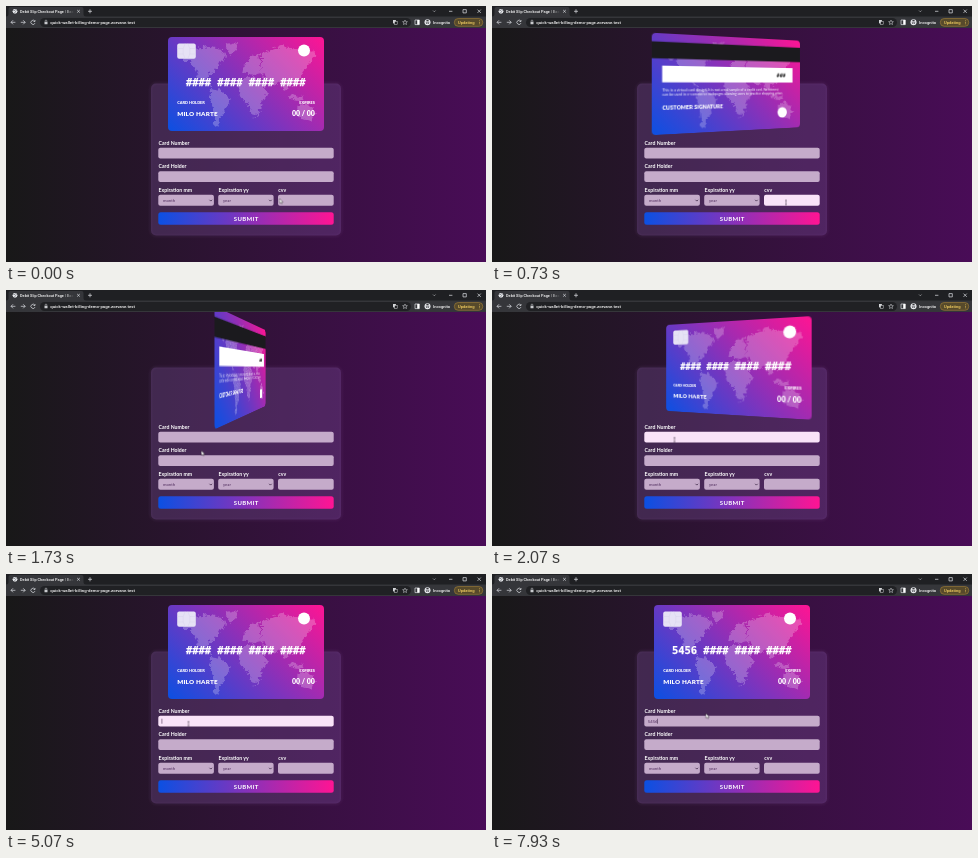
An HTML page for the animation above (8 s loop, 480x256 px).

```html
<!DOCTYPE html>
<html lang="en">
<head>
<meta charset="utf-8">
<title>Checkout form</title>
<style>
  html, body { margin: 0; width: 100%; height: 100%; overflow: hidden; background: #181818; }
  #stage { position: absolute; left: 0; top: 0; width: 480px; height: 256px; overflow: hidden; }
  svg { position: absolute; left: 0; top: 0; overflow: visible; }
  text { font-family: Lato, "Open Sans", sans-serif; fill: #fff; white-space: pre; }
  .ui { font-family: Roboto, "Noto Sans", sans-serif; font-size: 4.1px; font-weight: 500; }
  .label { font-size: 5.2px; font-weight: 700; }
  .value { font-size: 4.2px; fill: #4e2b5c; }
  .bold { font-weight: 900; }
  .num { font: 700 10.46px "DejaVu Sans Mono", "Noto Sans Mono", monospace; stroke: #fff; stroke-width: .25; }
  .field { fill: #c5abca; }
  .field.hot { fill: #f9e3f8; }
  .line { fill: none; stroke: #dfe1e5; stroke-width: .7; }

  #view { position: absolute; left: 0; top: 22px; width: 480px; height: 234px; overflow: hidden; }
  #scene { position: absolute; left: 162px; top: 9.3px; width: 156.25px; height: 93.75px; perspective: 312.5px; }
  #card { width: 100%; height: 100%; transform-style: preserve-3d; animation: flip 8s infinite; }
  .face {
    position: absolute; inset: 0; overflow: hidden; border-radius: 4px;
    background: linear-gradient(45deg, #0b50e2, #ff1493);
    backface-visibility: hidden;
  }
  .back { transform: rotateY(180deg); }
  #pointer { animation: glide 8s linear infinite; }

  @keyframes flip {
    0%, 1.52% { transform: rotateY(0deg); }
    14.02%, 18.56% { transform: rotateY(-180deg); }
    31.06%, 100% { transform: rotateY(0deg); }
  }
  @keyframes glide {
    0% { transform: translate(273.5px, 192.5px); }
    4.5%, 17% { transform: translate(294px, 196.5px); }
    18.5% { transform: translate(262px, 186px); }
    21.6% { transform: translate(195.5px, 160.7px); }
    25%, 68.8% { transform: translate(182.5px, 149.8px); }
    70%, 100% { transform: translate(213.8px, 139.4px); }
  }
</style>
</head>
<body>
<div id="stage">
  <svg width="480" height="256" viewBox="0 0 480 256">
    <defs>
      <linearGradient id="page"><stop stop-color="#181818"/><stop offset="1" stop-color="#490c57"/></linearGradient>
      <linearGradient id="hue"><stop stop-color="#0b50e2"/><stop offset="1" stop-color="#ff1493"/></linearGradient>
      <linearGradient id="fade"><stop offset=".8" stop-color="#35363a" stop-opacity="0"/><stop offset="1" stop-color="#35363a"/></linearGradient>
      <filter id="soft" x="-10%" y="-10%" width="120%" height="120%"><feGaussianBlur stdDeviation="1"/></filter>
      <filter id="coast">
        <feTurbulence baseFrequency=".16" numOctaves="2" seed="4"/>
        <feDisplacementMap in="SourceGraphic" scale="7" xChannelSelector="R" yChannelSelector="G"/>
      </filter>
      <pattern id="dots" width="1.5" height="1.5" patternUnits="userSpaceOnUse">
        <rect width="1.5" height="1.5" fill="#fff" opacity=".13"/>
        <circle cx=".75" cy=".75" r=".55" fill="#fff" opacity=".3"/>
      </pattern>
      <g id="map" fill="url(#dots)" filter="url(#coast)">
        <path d="M14 16L24 10 40 8 52 10 56 18 50 24 46 32 40 36 36 42 42 47 36 46 29 38 24 28 20 22 13 22Z"/>
        <path d="M56 5L68 3 66 11 60 16Z"/>
        <path d="M42 50L52 52 60 60 56 70 50 80 47 90 44 82 43 68 39 58Z"/>
        <path d="M72 40L84 38 92 44 98 54 92 64 88 76 82 79 78 66 70 56 68 48Z"/>
        <path d="M72 34L74 26 82 18 90 14 92 34 84 36Z"/>
        <path d="M92 14L110 8 130 10 146 14 140 24 132 34 128 44 122 46 114 52 110 44 102 46 96 40 92 34Z"/>
        <path d="M120 56L132 58 134 62 122 60Z"/>
        <path d="M126 68L136 64 146 74 140 82 128 78Z"/>
      </g>
    </defs>

    <rect width="480" height="256" fill="url(#page)"/>

    <!-- browser bar -->
    <rect width="480" height="11" fill="#1f2023"/>
    <path d="M0 10.5Q2.5 10.5 2.5 8V3Q2.5 1 4.5 1H75.5Q77.5 1 77.5 3V8Q77.5 10.5 80 10.5H480V22H0Z" fill="#35363a"/>
    <circle cx="9" cy="5.3" r="2.4" fill="#e8eaed"/>
    <path d="M7.3 4.5h1.6l.7 1.2-1.2 1.3M9.5 3.4l1.2 1.2" class="line" style="stroke:#55585e;stroke-width:.6"/>
    <text x="14" y="6.9" class="ui" style="font-size:3.9px">Debit Slip Checkout Page | Basic</text>
    <rect x="14" y="2" width="54" height="7" fill="url(#fade)"/>
    <rect x="67.9" y="2" width="3" height="7" fill="#35363a"/>
    <path class="line" d="M71.2 4l2.6 2.6m0-2.6l-2.6 2.6M82 5.3h4m-2-2v4"/>
    <path class="line" d="M427 4.5l1.3 1.3 1.3-1.3" style="stroke-width:.5"/>
    <path class="line" d="M443 5.3h3.4M457 3.6h3.3v3.3h-3.3zM471.5 3.6l3.3 3.3m0-3.3l-3.3 3.3"/>
    <rect x="34" y="12" width="371" height="9" rx="4.5" fill="#202124"/>
    <path class="line" d="M9.4 16.3H5m2-2l-2 2 2 2M14.8 16.3h4.4m-2-2l2 2-2 2M28.8 15.2a2.1 2.1 0 1 0 .2 1.9M29 14v1.5h-1.5"/>
    <rect x="38.5" y="15.7" width="3" height="2.5" rx=".3" fill="#c8cacd"/>
    <path class="line" d="M39.1 15.7v-.7a.9.9 0 0 1 1.8 0v.7" style="stroke-width:.5"/>
    <text x="44.3" y="17.9" class="ui" style="font-size:4.3px">quick-wallet-billing-demo-page.zorvane.test</text>
    <rect x="387" y="14" width="2.9" height="3.4" fill="#d5d7da"/>
    <rect x="388.6" y="15.4" width="2.6" height="3.2" fill="#202124" stroke="#d5d7da" stroke-width=".5"/>
    <path class="line" style="stroke-width:.5" d="M399 14l.7 1.6 1.7.1-1.3 1.1.4 1.7-1.5-.9-1.5.9.4-1.7-1.3-1.1 1.7-.1z"/>
    <path d="M409 14h4.3v4.6H409z" class="line"/>
    <path d="M411.2 14h2.1v4.6h-2.1z" fill="#fff"/>
    <circle cx="421.5" cy="16.3" r="3" fill="#e8eaed"/>
    <path d="M419.7 16.2h3.6M420.5 15l.4-.8h1.2l.4.8z" stroke="#35363a" stroke-width=".5"/>
    <circle cx="420.7" cy="17.2" r=".6" fill="#35363a"/><circle cx="422.3" cy="17.2" r=".6" fill="#35363a"/>
    <text x="427" y="17.8" class="ui">Incognito</text>
    <rect x="448.3" y="12.5" width="28.5" height="7.8" rx="3.9" fill="#574a2b" stroke="#b58d38" stroke-width=".5"/>
    <text x="452" y="17.9" class="ui" style="fill:#fdd663">Updating</text>
    <path d="M473.5 14.5v.7m0 .8v.7m0 .8v.7" stroke="#fdd663" stroke-width=".7"/>

    <!-- form -->
    <rect x="144.5" y="77" width="191" height="153" rx="6" fill="none" stroke="#a878c4" stroke-opacity=".12" stroke-width="1.5" filter="url(#soft)"/>
    <rect x="145" y="77.5" width="190" height="152" rx="5" fill="#9669be" fill-opacity=".24"/>
    <text x="152.5" y="139" class="label">Card Number</text>
    <text x="152.5" y="162.4" class="label">Card Holder</text>
    <text x="152.5" y="185.8" class="label">Expiration mm</text>
    <text x="212.5" y="185.8" class="label">Expiration yy</text>
    <text x="272.3" y="185.8" class="label">cvv</text>
    <rect id="number" class="field" x="152.3" y="141.7" width="175.4" height="10.8" rx="2"/>
    <rect id="holder" class="field" x="152.3" y="165.2" width="175.4" height="10.8" rx="2"/>
    <rect class="field" x="152.3" y="188.8" width="55.6" height="10.9" rx="2"/>
    <rect class="field" x="212.2" y="188.8" width="55.4" height="10.9" rx="2"/>
    <rect id="cvv" class="field" x="272" y="188.8" width="55.7" height="10.9" rx="2"/>
    <text x="157" y="195.9" class="value">month</text>
    <text x="217" y="195.9" class="value">year</text>
    <path d="M203.5 193.8l1.3 1.3 1.3-1.3M263.1 193.8l1.3 1.3 1.3-1.3" fill="none" stroke="#2b1636" stroke-width=".7"/>
    <text id="typed" x="155.8" y="148.7" class="value"></text>
    <rect id="caret" y="144.7" width=".5" height="5" fill="#2a1233"/>
    <rect x="152.3" y="206.3" width="175.4" height="12.4" rx="2.5" fill="url(#hue)"/>
    <text x="240.2" y="214.7" text-anchor="middle" style="font-size:6px;font-weight:700;letter-spacing:.35px">SUBMIT</text>
  </svg>

  <div id="view"><div id="scene"><div id="card">
    <div class="face">
      <svg width="156.25" height="93.75">
        <use href="#map"/>
        <rect x="9.2" y="6.5" width="18.6" height="15.2" rx="2" fill="#e6e2f5"/>
        <path d="M9.2 11.5h6v5.5h-6M27.8 11.5h-6v5.5h6M15.2 11.5l2-5m4.6 5l-2-5M15.2 17l2 4.7m4.6-4.7l-2 4.7" fill="none" stroke="#d4cfea" stroke-width=".4"/>
        <circle cx="136" cy="13.6" r="6" fill="#fff"/>
        <text id="digits" class="num" x="17.9" y="49.4"></text>
        <text x="9.2" y="67.2" class="bold" style="font-size:3.9px">CARD HOLDER</text>
        <text x="9.2" y="79" class="bold" style="font-size:6.3px;letter-spacing:.2px">MILO HARTE</text>
        <text x="146.9" y="67.2" class="bold" text-anchor="end" style="font-size:3.9px">EXPIRES</text>
        <text x="146.9" y="79" class="bold" text-anchor="end" style="font-size:7px">00 / 00</text>
      </svg>
    </div>
    <div class="face back">
      <svg width="156.25" height="93.75">
        <use href="#map"/>
        <rect y="7.8" width="156.3" height="15.6" fill="#1b1a1e"/>
        <rect x="9.4" y="30" width="137.5" height="15.5" fill="#fff"/>
        <text x="138.6" y="39.9" text-anchor="end" style="font:700 6px 'DejaVu Sans Mono',monospace;fill:#222">###</text>
        <text x="9.4" y="54.3" style="font-size:3.6px">This is a virtual card design. It is not a real sample of a credit card. No interest</text>
        <text x="9.4" y="58.5" style="font-size:3.6px">can be used in e-commerce webpages allowing users to practice shopping when</text>
        <text x="9.4" y="71" class="bold" style="font-size:5.2px">CUSTOMER SIGNATURE</text>
        <circle cx="134.5" cy="77" r="5.5" fill="#fff"/>
      </svg>
    </div>
  </div></div></div>

  <svg id="pointer" width="8" height="8">
    <path id="arrow" d="M0 0V4.6L1.1 3.7 1.9 5.3 2.7 4.9 2 3.4H3.4Z" fill="#fff" stroke="#111" stroke-width=".35"/>
    <path id="beam" d="M-.8 -2.2H.8M0 -2.2V2.2M-.8 2.2H.8" fill="none" stroke="#1c1020" stroke-width=".45"/>
  </svg>
</div>

<script>
  const $ = id => document.getElementById(id);
  const clock = $('card').getAnimations()[0];
  const keys = [7400, 7530, 7700, 7870];
  const code = '5456';
  const focusAt = 2400, blink = 533.3;
  const within = (t, from, to) => t >= from && t < to;
  const show = (id, on) => $(id).setAttribute('visibility', on ? 'visible' : 'hidden');

  function setText(id, value) {
    if ($(id).textContent !== value) $(id).textContent = value;
  }

  function draw() {
    const t = (clock.currentTime || 0) % 8000;
    const overCvv = within(t, 60, 1450);
    const overHolder = within(t, 1590, 1690);
    const overNumber = within(t, 1960, 5560);
    $('cvv').classList.toggle('hot', overCvv);
    $('holder').classList.toggle('hot', overHolder);
    $('number').classList.toggle('hot', overNumber);

    const beam = overCvv || overHolder || overNumber;
    show('beam', beam);
    show('arrow', !beam);

    const count = keys.filter(k => t >= k).length;
    const typed = code.slice(0, count);
    setText('typed', typed);
    setText('digits', typed.padEnd(4, '#') + ' ####'.repeat(3));

    const lit = Math.floor((t - focusAt) / blink) % 2 === 0;
    show('caret', t >= focusAt && (count > 0 || lit));
    $('caret').setAttribute('x', 155.7 + count * 2.44);
    requestAnimationFrame(draw);
  }
  draw();
</script>
</body>
</html>
```
